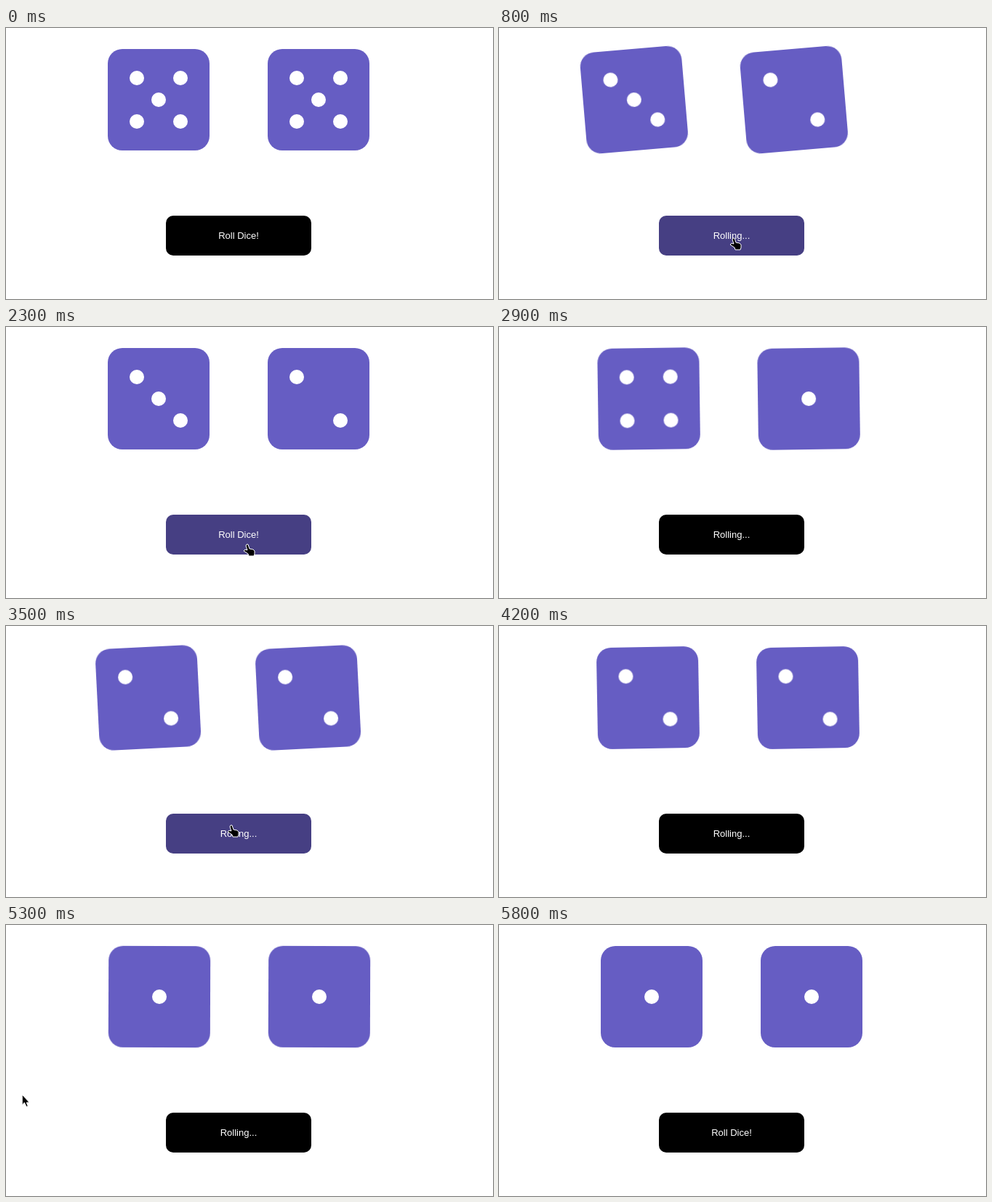
Recreate the animation shown at these times as an HTML page. Size 670 by 374 pixels, loop 6.1 s.

```html
<!DOCTYPE html>
<html lang="en">
<head>
<meta charset="utf-8">
<title>Roll Dice</title>
<style>
  html, body { margin: 0; width: 100%; height: 100%; overflow: hidden; background: #fff; }
  #stage { position: relative; width: 670px; height: 374px; overflow: hidden; }
  .die {
    position: absolute; top: 29px; width: 140px; height: 140px;
    border-radius: 20px; background: #665dc3;
  }
  .die.rolling { animation: wobble 1s ease paused both; }
  .die svg { display: block; fill: #fff; }
  #button {
    position: absolute; left: 220px; top: 259px; width: 200px; height: 55px;
    border-radius: 10px; background: #000; color: #fff; text-align: center;
    font: 13px/55px "Liberation Sans", Arial, sans-serif;
  }
  #button.hover { background: #463f83; }
  #cursor { position: absolute; left: 0; top: 0; overflow: visible; }
  #cursor path { fill: #000; stroke: #fff; stroke-linejoin: round; }
  /* each swing shifts 5px per degree of tilt */
  @keyframes wobble {
    0%, 100% { --tilt: 0; transform: translateX(0) rotate(0deg); }
    15% { transform: translateX(-25px) rotate(-5deg); }
    30% { transform: translateX(20px) rotate(3deg); }
    45% { transform: translateX(-15px) rotate(-3deg); }
    60% { transform: translateX(10px) rotate(2deg); }
    75% { transform: translateX(-5px) rotate(-1deg); }
  }
</style>
</head>
<body>
<div id="stage">
  <div class="die" style="left:140px"></div>
  <div class="die" style="left:360px"></div>
  <div id="button">Roll Dice!</div>
  <svg id="cursor" width="20" height="20"><path/></svg>
</div>
<script>
const LOOP = 6100, STEP = 100;

// lag: how far the wobble has run when the roll first shows
// enter, leave: when the pointer comes to press the button at x, y
const rolls = [
  { at: 700, lag: 15, faces: [3, 2], enter: 400, leave: 900, x: 322, y: 290 },
  { at: 2500, lag: 90, faces: [4, 1], enter: 1500, leave: 2600, x: 331, y: 300 },
  { at: 3500, lag: 50, faces: [2, 2], enter: 3300, leave: 3700, x: 309, y: 275 },
  { at: 4800, lag: 152, faces: [1, 1], enter: 4600, leave: 4900, x: 318, y: 290 }
];

const hand = 'M0 0H2L4 6 9 7 11 9V13L10 16H3L2 13-4 9-2 7 1 8-1 2Z';
const arrow = 'M0 0V15L3 11 6 17 8 16 6 11H10Z';

const dice = [...document.querySelectorAll('.die')];
const button = document.getElementById('button');
const cursor = document.getElementById('cursor');

// a spot shows for the faces its test accepts; its opposite comes with it
function pips(n) {
  const dot = (x, y) => `<circle cx="${70 + 30 * x}" cy="${70 + 30 * y}" r="10"/>`;
  const pair = (x, y) => dot(x, y) + dot(-x, -y);
  return '<svg width="140" height="140">' +
    (n % 2 ? dot(0, 0) : '') +
    (n > 1 ? pair(-1, -1) : '') +
    (n > 3 ? pair(1, -1) : '') +
    (n > 5 ? pair(1, 0) : '') + '</svg>';
}

function pointerAt(t) {
  const press = rolls.find(r => t >= r.enter && t < r.leave);
  if (press) {
    const rise = Math.max(0, 1 - (t - press.enter) / STEP);
    return { x: press.x, y: press.y + 66 * rise };
  }
  // last, it sweeps up along the left edge
  const u = (t - 5100) / 600;
  if (u < 0 || u > 1) return null;
  return { x: 20 + 20 * (2 * u - 1) ** 2, y: 348 - 342 * u };
}

function draw(t) {
  const roll = rolls.filter(r => t >= r.at).pop();
  const phase = roll ? t - roll.at + roll.lag : LOOP;
  const rolling = phase < 910;
  const faces = roll ? roll.faces : [5, 5];

  dice.forEach((die, i) => {
    die.innerHTML = pips(faces[i]);
    die.classList.toggle('rolling', rolling);
    die.style.animationDelay = rolling ? -phase + 'ms' : '';
  });

  const pos = pointerAt(t);
  const over = !!pos && pos.x >= 220 && pos.x < 420 && pos.y >= 259 && pos.y < 314;
  button.textContent = rolling ? 'Rolling...' : 'Roll Dice!';
  button.classList.toggle('hover', over);
  cursor.style.display = pos ? '' : 'none';
  if (pos) {
    cursor.style.transform = `translate(${pos.x}px, ${pos.y}px)`;
    cursor.firstElementChild.setAttribute('d', over ? hand : arrow);
  }
}

let shown = -1;
function tick() {
  const t = Math.floor(performance.now() % LOOP / STEP) * STEP;
  if (t !== shown) draw(shown = t);
  requestAnimationFrame(tick);
}
tick();
</script>
</body>
</html>
```
